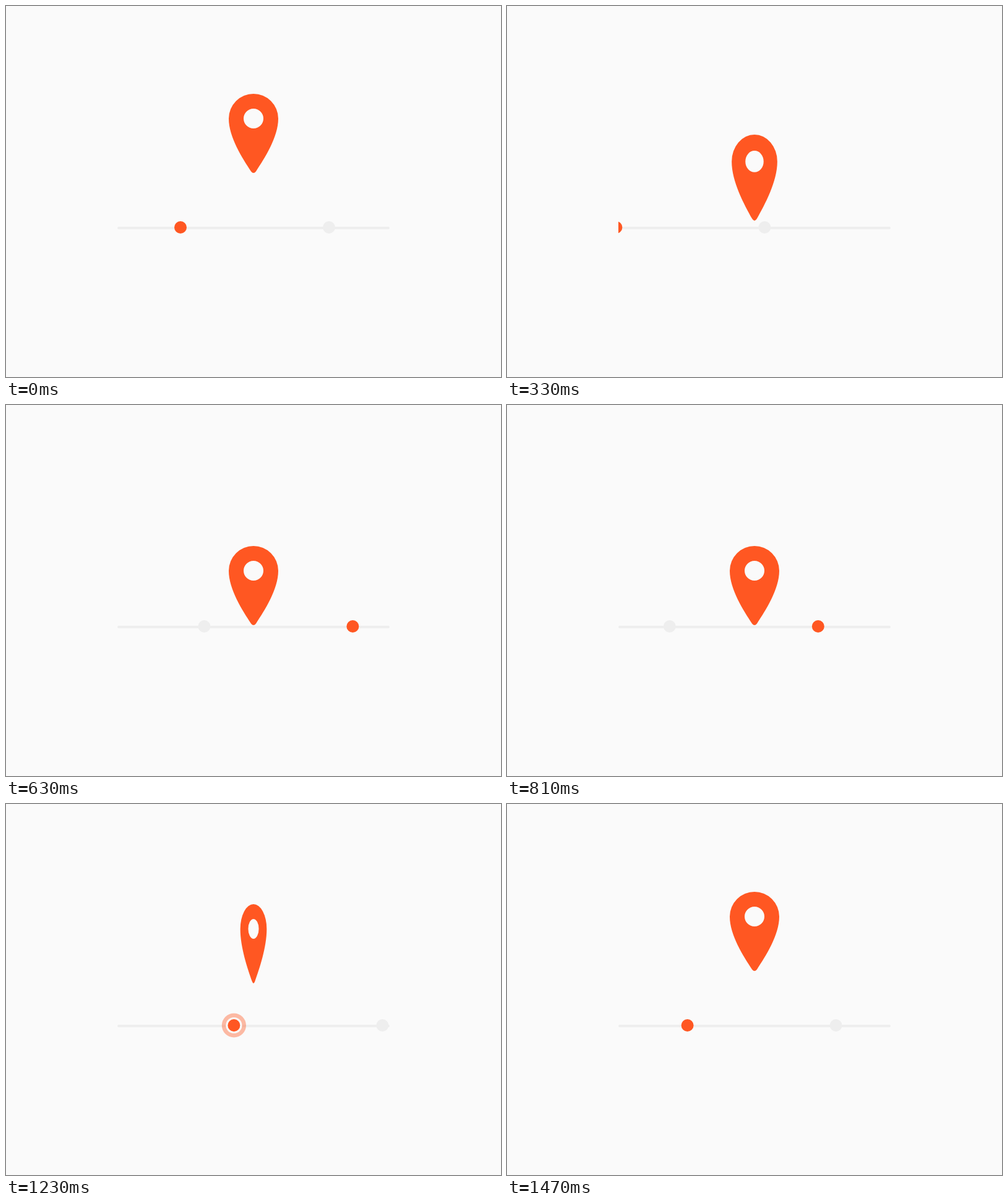
Write an HTML page with a canvas that moves like this. It is 800 by 600 pixels and loops after 1.5 s.

```html
<!DOCTYPE html>
<html>
<head>
<meta charset="utf-8">
<title>Map pin</title>
<style>
  html, body { margin: 0; width: 100%; height: 100%; overflow: hidden; background: #fafafa; }
  canvas { display: block; }
</style>
</head>
<body>
<canvas id="stage" width="800" height="600"></canvas>
<script>
const ctx = document.getElementById('stage').getContext('2d');
const LOOP = 1500, STEP = 30;
const BG = '#fafafa', ORANGE = '#ff5722', GREY = '#eeeeee';
const TRACK = { left: 180, right: 620, y: 358 };
const TOP = 270, GROUND = 356;

const clamp = v => Math.max(0, Math.min(1, v));
const progress = (t, from, to) => clamp((t - from) / (to - from));
const mix = (a, b, p) => a + (b - a) * p;

// cubic-bezier(.42, 0, .58, 1), solved by bisection
function easeInOut(x) {
  let lo = 0, hi = 1;
  for (let i = 0; i < 24; i++) {
    const s = (lo + hi) / 2, r = 1 - s;
    if (1.26 * s * r * r + 1.74 * s * s * r + s * s * s < x) lo = s;
    else hi = s;
  }
  return lo * lo * (3 - 2 * lo);
}

// [time, scaleX, scaleY]
const SQUASH = [[0, 1, 1], [310, 0.9, 1.11], [500, 1.1, 0.9], [600, 1, 1], [LOOP, 1, 1]];

function pinScale(t) {
  const i = SQUASH.findIndex(k => k[0] > t);
  const a = SQUASH[i - 1], b = SQUASH[i];
  const p = progress(t, a[0], b[0]);
  return [mix(a[1], b[1], p), mix(a[2], b[2], p)];
}

function circle(x, y, r, color) {
  ctx.fillStyle = color;
  ctx.beginPath();
  ctx.arc(x, y, r, 0, 2 * Math.PI);
  ctx.fill();
}

function drawPin(t) {
  const drop = easeInOut(progress(t, 0, 425));
  const rise = easeInOut(progress(t, 1000, 1345));
  const turn = Math.cos(Math.PI * progress(t, 1012, 1333));
  const [sx, sy] = pinScale(t);
  ctx.save();
  ctx.translate(400, mix(TOP, GROUND, drop - rise));
  ctx.scale(sx * turn, sy);
  ctx.fillStyle = ORANGE;
  ctx.beginPath();
  ctx.arc(0, -88, 40, Math.PI, 0);
  ctx.bezierCurveTo(40, -58, 18, -24, 4, -2.6);
  ctx.quadraticCurveTo(0, 2.6, -4, -2.6);
  ctx.bezierCurveTo(-18, -24, -40, -58, -40, -88);
  ctx.moveTo(16, -88);
  ctx.arc(0, -88, 16, 0, 2 * Math.PI);
  ctx.fill('evenodd');
  ctx.restore();
}

function drawRing(x, t) {
  const p = progress(t, 1050, 1350);
  if (p === 0 || p === 1) return;
  const r = mix(10, 26, p);
  ctx.globalAlpha = 1 - p;
  circle(x, TRACK.y, r, ORANGE);
  ctx.globalAlpha = 1;
  circle(x, TRACK.y, r * 2 / 3, BG);
}

function drawTrack(t) {
  ctx.fillStyle = GREY;
  ctx.beginPath();
  ctx.roundRect(TRACK.left, 357, TRACK.right - TRACK.left, 4, 2);
  ctx.fill();

  ctx.save();
  ctx.beginPath();
  ctx.rect(TRACK.left, 0, TRACK.right - TRACK.left, 600);
  ctx.clip();
  const shift = 480 * t / LOOP;
  for (let lap = 0; lap < 2; lap++) {
    const x = 282 - shift + 480 * lap;
    circle(x + 240, TRACK.y, 10, GREY);
    drawRing(x, t);
    circle(x, TRACK.y, 10, ORANGE);
  }
  ctx.restore();
}

function frame() {
  const t = Math.floor(performance.now() % LOOP / STEP) * STEP;
  ctx.fillStyle = BG;
  ctx.fillRect(0, 0, 800, 600);
  drawTrack(t);
  drawPin(t);
  requestAnimationFrame(frame);
}
frame();
</script>
</body>
</html>
```
